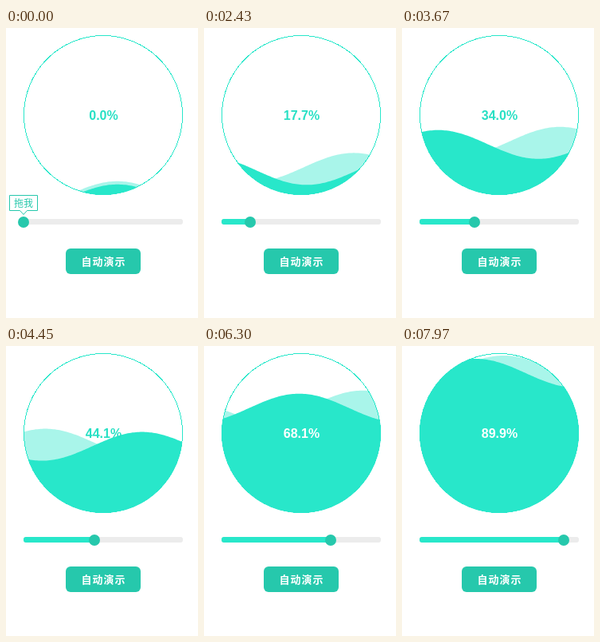
An HTML page that plays this animation: 241x363 px, repeating every 8 s.

```html
<!DOCTYPE html>
<html lang="zh">
<head>
<meta charset="utf-8">
<title>Liquid gauge</title>
<style>
  html, body { margin: 0; width: 100%; height: 100%; overflow: hidden; background: #fff; }
  svg { display: block; width: 241px; height: 363px; }
  text { text-anchor: middle; }
  .water { fill: #28e7ca; }
  .accent { fill: #26c8ac; }
  .cjk { font-family: "Noto Sans CJK SC", "Noto Sans CJK", sans-serif; }
  .crisp { shape-rendering: crispEdges; }
  #label { font: bold 16px "Liberation Sans", Arial, sans-serif; }
</style>
</head>
<body>
<svg viewBox="0 0 241 363">
  <clipPath id="ball"><circle class="crisp" cx="122" cy="109" r="100"/></clipPath>
  <g clip-path="url(#ball)">
    <path id="back" class="water" opacity=".4"/>
    <path id="front" class="water"/>
  </g>
  <circle class="crisp" cx="122" cy="109" r="99.5" fill="none" stroke="#28e7ca"/>
  <text id="label" x="122.5" y="115"></text>

  <rect x="22" y="239" width="200" height="7" rx="3" fill="#ececec"/>
  <rect id="bar" class="water" x="22" y="239" height="7" rx="3"/>
  <circle id="knob" class="accent" cy="243" r="7"/>

  <g id="tip">
    <path d="M4.5 209.5H39.5V228.5H26.5L22 233.5L17.5 228.5H4.5Z" fill="#fff" stroke="#26c8ac"/>
    <text class="cjk accent" x="22" y="223.5" font-size="12" font-weight="500">拖我</text>
  </g>

  <rect class="accent" x="75" y="276" width="94" height="32" rx="6"/>
  <text class="cjk" x="122.5" y="297" font-size="13" font-weight="700" letter-spacing="1" fill="#fff">自动演示</text>
</svg>
<script>
  const LOOP = 8000, START = 1061, TIP_END = 1040;
  const PERIOD = 80 * Math.PI, AMP = 18;
  const $ = id => document.getElementById(id);
  const [back, front, label, bar, knob, tip] =
    ['back', 'front', 'label', 'bar', 'knob', 'tip'].map($);

  // time, percent, front crest x, back crest x
  const KEYS = [
    [0, 0, 140, 140],
    [START, 0, -30, -58.5],
    [2430, 17.7, -248, -314.5],
    [3670, 34, -457, -555.5],
    [4450, 44.1, -583, -704.5],
    [5560, 58.5, -766, -917],
    [7080, 78.1, -1012, -1204],
    [7970, 89.9, -1164, -1380]
  ];

  // Wave with a crest at x = 0, moved by its transform
  let d = 'M-260 300';
  for (let x = -260; x <= 520; x += 2)
    d += `L${x} ${(-AMP * Math.cos(x * 2 * Math.PI / PERIOD)).toFixed(2)}`;
  d += 'L520 300Z';
  back.setAttribute('d', d);
  front.setAttribute('d', d);

  function sample(t) {
    let i = 1;
    while (i < KEYS.length - 1 && t > KEYS[i][0]) i++;
    const a = KEYS[i - 1], b = KEYS[i];
    const k = (t - a[0]) / (b[0] - a[0]);
    return a.map((v, n) => v + (b[n] - v) * k);
  }

  function place(wave, crest, y) {
    const x = (crest % PERIOD + PERIOD) % PERIOD;
    wave.setAttribute('transform', `translate(${x} ${y})`);
  }

  function draw(t) {
    const [, p, frontX, backX] = sample(t);
    const level = 209 - 2 * p;
    place(back, backX, level + 0.8);
    place(front, frontX, level + 4.8);
    label.textContent = p.toFixed(1) + '%';
    label.setAttribute('fill', p < 50 ? '#28e0c4' : '#fff');

    // The slider sits on whole pixels
    const done = Math.round(2.01 * p + 0.4);
    bar.setAttribute('width', done);
    knob.setAttribute('cx', 22 + done);
    tip.setAttribute('visibility', t < TIP_END ? 'visible' : 'hidden');
  }

  const origin = performance.now();
  function tick() {
    draw((performance.now() - origin) % LOOP);
    requestAnimationFrame(tick);
  }
  tick();
</script>
</body>
</html>
```
